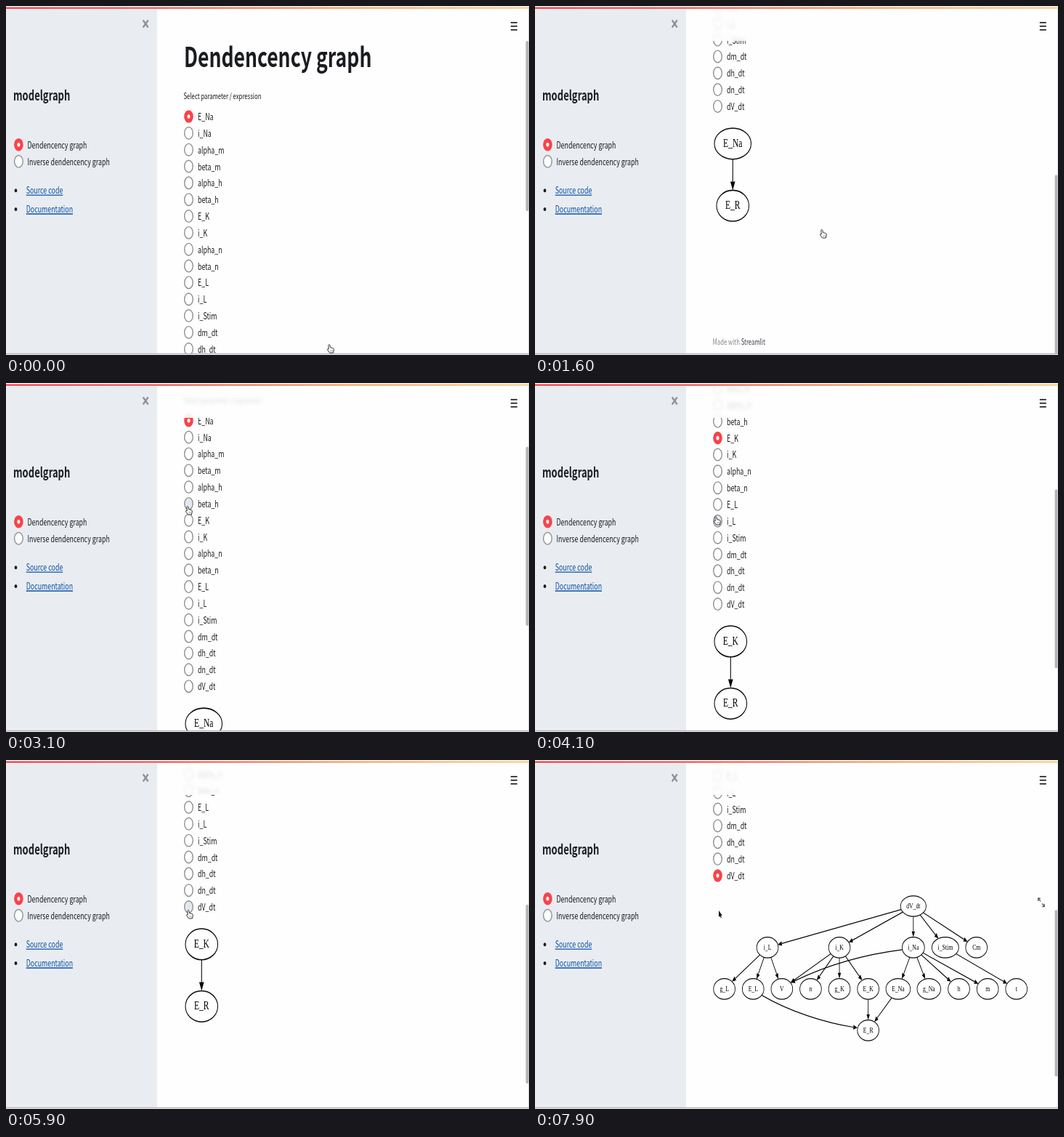
An HTML page with a canvas for the animation above (8 s loop, 720x480 px).

```html
<!DOCTYPE html>
<html lang="en">
<head>
<meta charset="utf-8">
<title>modelgraph</title>
<style>
html, body { margin: 0; width: 720px; height: 480px; overflow: hidden; background: #fff; }
canvas { display: block; width: 720px; height: 480px; }
</style>
</head>
<body>
<canvas id="stage" width="720" height="480"></canvas>
<script>
const ctx = document.getElementById('stage').getContext('2d');
const LOOP = 8000, STEP = 100;
const SX = 0.619, SY = 0.89;          // the page is squeezed sideways
const SANS = '"Noto Sans CJK JP", "Noto Sans CJK SC", "Noto Sans CJK", "Open Sans", sans-serif';
const SERIF = '"Liberation Serif", "Noto Serif", serif';
const INK = '#1b1c21', RED = '#f9424a', LINK = '#0a50a5', HEADER = 48;
const ROW0 = 152, ROW = 22.84;

const params = ['E_Na', 'i_Na', 'alpha_m', 'beta_m', 'alpha_h', 'beta_h', 'E_K', 'i_K', 'alpha_n',
  'beta_n', 'E_L', 'i_L', 'i_Stim', 'dm_dt', 'dh_dt', 'dn_dt', 'dV_dt'];

// Graphs in points: nodes are [label, x, y, rx], edges are index pairs with optional curve points
const pair = (name, rx) => ({
  x: 247 + rx * 0.825, y: 568.8, k: 1, pen: 1.3,
  nodes: [[name, 0, 0, rx], ['E_R', 0, 72, 27]], edges: [[0, 1]]
});
const full = {
  x: 245.8, y: 559.5, k: 0.6665, pen: 1.55,
  nodes: [['dV_dt', 500, 0, 32],
    ['i_L', 135, 72, 27], ['i_K', 315, 72, 27], ['i_Na', 500, 72, 28], ['i_Stim', 580, 72, 33.6], ['Cm', 658, 72, 27],
    ['g_L', 27, 144, 27], ['E_L', 99, 144, 27], ['V', 171, 144, 27], ['n', 243, 144, 27], ['g_K', 315, 144, 27],
    ['E_K', 387, 144, 27], ['E_Na', 462, 144, 30.6], ['g_Na', 539, 144, 29.5], ['h', 614, 144, 27],
    ['m', 686, 144, 27], ['t', 758, 144, 27], ['E_R', 387, 216, 27]],
  edges: [[0, 1], [0, 2], [0, 3], [0, 4], [0, 5], [1, 6], [1, 7], [1, 8], [2, 8], [2, 9], [2, 10], [2, 11],
    [3, 12], [3, 13], [3, 14], [3, 15], [4, 16], [11, 17], [12, 17],
    [3, 8, [473, 75.6, 353, 86, 262, 110, 194, 133]],
    [7, 17, [121, 155, 189, 183, 280, 203, 360, 211.6]]]
};
const graphNa = pair('E_Na', 30.6), graphK = pair('E_K', 27);

const scrollKeys = [[0, 0], [1000, 0], [1600, 379.5], [1900, 379.5], [2700, 100.3], [3700, 100.3],
  [4600, 371.5], [4900, 371.5], [5400, 315.4], [6600, 315.4], [7100, 378.5], [7400, 420], [7700, 358.5]];
const cursorKeys = [[0, 447, 471], [700, 397, 313], [1900, 397, 313], [2900, 253, 171], [3100, 252, 175],
  [3400, 251, 189], [5400, 251, 189], [5800, 253, 212]];

function at(keys, t, i = 1) {
  const n = keys.findIndex(k => k[0] > t);
  if (n < 0) return keys[keys.length - 1][i];
  const a = keys[n - 1], b = keys[n], u = (t - a[0]) / (b[0] - a[0]);
  return a[i] + (b[i] - a[i]) * u * u * (3 - 2 * u);
}

function text(str, x, y, size, color = INK, weight = 400) {
  ctx.save();
  ctx.translate(x, y);
  ctx.scale(SX, SY);
  ctx.font = `${weight} ${size * 0.894}px ${SANS}`;
  ctx.fillStyle = color;
  ctx.fillText(str, 0, 0);
  const w = ctx.measureText(str).width * SX;
  ctx.restore();
  return w;
}

function oval(x, y, rx, ry, fill, stroke, width) {
  ctx.beginPath();
  ctx.ellipse(x, y, rx, ry, 0, 0, Math.PI * 2);
  if (fill) { ctx.fillStyle = fill; ctx.fill(); }
  if (stroke) { ctx.strokeStyle = stroke; ctx.lineWidth = width; ctx.stroke(); }
}

function line(pts, color, width) {
  ctx.beginPath();
  pts.forEach(p => ctx.lineTo(p[0], p[1]));
  ctx.strokeStyle = color;
  ctx.lineWidth = width;
  ctx.stroke();
}

function radio(x, y, label, lx, on, hover) {
  if (on) {
    oval(x, y, 6.3, 8.8, RED);
    oval(x, y, 2, 2.8, '#fff');
  } else oval(x, y, 5.8, 8.3, hover ? '#e4e8ee' : '#fff', '#8f9093', 1.4);
  text(label, lx, y + 5, 16);
}

function edge(a, b, curve) {
  let p = curve;
  if (!p) {
    const dx = b[1] - a[1], dy = b[2] - a[2];
    const cut = n => 1 / Math.hypot(dx / n[3], dy / 18);
    const s = cut(a), e = 1 - cut(b);
    const x0 = a[1] + dx * s, y0 = a[2] + dy * s, x1 = a[1] + dx * e, y1 = a[2] + dy * e;
    p = [x0, y0, x0, y0, x1 - dx * 0.01, y1 - dy * 0.01, x1, y1];
  }
  const ang = Math.atan2(p[7] - p[5], p[6] - p[4]), c = Math.cos(ang), s = Math.sin(ang);
  const bx = p[6] - 10 * c, by = p[7] - 10 * s;
  ctx.beginPath();
  ctx.moveTo(p[0], p[1]);
  if (curve) ctx.bezierCurveTo(p[2], p[3], p[4], p[5], bx, by);
  else ctx.lineTo(bx, by);
  ctx.stroke();
  ctx.beginPath();
  ctx.moveTo(p[6], p[7]);
  ctx.lineTo(bx - 4 * s, by + 4 * c);
  ctx.lineTo(bx + 4 * s, by - 4 * c);
  ctx.closePath();
  ctx.fill();
}

function drawGraph(g) {
  ctx.save();
  ctx.translate(g.x, g.y);
  ctx.scale(SX * 4 / 3 * g.k, SY * 4 / 3 * g.k);
  ctx.fillStyle = ctx.strokeStyle = '#000';
  ctx.lineWidth = g.pen;
  g.edges.forEach(([a, b, curve]) => edge(g.nodes[a], g.nodes[b], curve));
  ctx.font = `14px ${SERIF}`;
  ctx.textAlign = 'center';
  for (const [name, x, y, rx] of g.nodes) {
    oval(x, y, rx, 18, '#fff', '#0a0a0a', g.pen);
    ctx.fillStyle = '#000';
    ctx.fillText(name, x, y + 3.7);
  }
  ctx.restore();
}

function expandIcon(x, y, alpha) {
  ctx.save();
  ctx.translate(x, y);
  ctx.globalAlpha *= alpha;
  for (const d of [-1, 1]) {
    line([[d * 1, d * 1.5], [d * 4, d * 5.5]], '#2c2d35', 1.4);
    line([[d * 1.2, d * 5.7], [d * 4.2, d * 5.7], [d * 4.2, d * 1.8]], '#2c2d35', 1.4);
  }
  ctx.restore();
}

function drawContent(s) {
  ctx.save();
  ctx.translate(0, -s.scroll);
  text('Dendencency graph', 245, 84, 48, INK, 700);
  text('Select parameter / expression', 244.5, 128, 14);
  params.forEach((name, i) => {
    const y = ROW0 + ROW * i;
    const hover = s.hand && s.cx < 260 && Math.abs(s.cy - 3 + s.scroll - y) < 10;
    radio(251.5, y, name, 264, i === s.selected, hover);
  });
  drawGraph(s.graph);
  if (s.icon) expandIcon(697, 554.4, s.icon);
  const foot = s.graph === full ? 913 : 845;
  const w = text('Made with ', 244.5, foot, 14, '#85878f');
  text('Streamlit', 244.5 + w, foot, 14, '#3f414a');
  ctx.restore();
}

function clipped(y, h, draw) {
  ctx.save();
  ctx.beginPath();
  ctx.rect(208, y, 512, h);
  ctx.clip();
  draw();
  ctx.restore();
}

function drawSidebar() {
  ctx.fillStyle = '#e9edf2';
  ctx.fillRect(0, 4, 208, 474);
  line([[188.7, 19.5], [195.7, 29.5]], '#8e9096', 2.2);
  line([[195.7, 19.5], [188.7, 29.5]], '#8e9096', 2.2);
  text('modelgraph', 10, 130, 23.6, INK, 700);
  radio(17.4, 190.7, 'Dendencency graph', 29.5, true);
  radio(17.4, 213.8, 'Inverse dendencency graph', 29.5, false);
  [['Source code', 253.7], ['Documentation', 279.5]].forEach(([label, y]) => {
    oval(13.5, y, 1.9, 2.5, INK);
    const w = text(label, 27.7, y + 4.5, 16, LINK);
    line([[27.7, y + 6.5], [27.7 + w, y + 6.5]], LINK, 1.3);
  });
}

function drawCursor(s) {
  ctx.save();
  ctx.translate(s.cx, s.cy);
  const shape = s.hand
    ? 'M-3.2-4.6Q-2.2-6.6-1.1-4.6L-.5-1.4 2.8-.6Q4.6 0 4.3 2L3.4 6H-1.4L-4.6 1.6Q-4.6-.2-2.7.9Z'
    : 'M0-5V4L1.6 2.4 2.9 5.2 4 4.6 2.8 1.9H4.8Z';
  const path = new Path2D(shape);
  ctx.lineWidth = 1;
  ctx.fillStyle = s.hand ? '#fff' : '#111';
  ctx.strokeStyle = s.hand ? '#333' : '#fff';
  if (!s.hand) ctx.stroke(path);
  ctx.fill(path);
  if (s.hand) {
    ctx.stroke(path);
    line([[0, 2], [0, 4.5]], '#777', 0.7);
    line([[2, 2], [2, 4.5]], '#777', 0.7);
  }
  ctx.restore();
}

function drawChrome(s) {
  [22.8, 27.8, 32.8].forEach(y => line([[694.8, y], [703.8, y]], '#1f2026', 1.7));
  const big = s.graph === full;
  const top = (big ? 35 : 36) + s.scroll * (big ? 0.478 : 0.517), end = top + (big ? 229 : 246);
  const from = Math.max(top, HEADER);
  ctx.fillStyle = '#d6d7d9';
  ctx.fillRect(719.2, 4, 0.8, 474);
  ctx.fillStyle = '#b4b5b7';
  ctx.beginPath();
  ctx.roundRect(715.6, from, 3.9, end - from, 2);
  ctx.fill();
  const bar = ctx.createLinearGradient(0, 0, 720, 0);
  bar.addColorStop(0, '#f5323f');
  bar.addColorStop(0.3, '#f4514a');
  bar.addColorStop(0.65, '#f9a05a');
  bar.addColorStop(1, '#fbd287');
  ctx.fillStyle = '#f0eeee';
  ctx.fillRect(0, 0, 720, 2);
  ctx.fillStyle = bar;
  ctx.fillRect(0, 1.7, 720, 2.1);
  ctx.fillStyle = '#b3b4b6';
  ctx.fillRect(0, 477.7, 720, 1.4);
  ctx.fillStyle = '#e4e4e5';
  ctx.fillRect(0, 479.1, 720, 0.9);
}

function stateAt(t) {
  return {
    scroll: at(scrollKeys, t),
    cx: at(cursorKeys, t, 1),
    cy: at(cursorKeys, t, 2),
    hand: t < 4300 || (t >= 5500 && t < 6600),
    selected: t < 3600 ? 0 : t < 6300 ? 6 : 16,
    graph: t < 3700 ? graphNa : t < 6500 ? graphK : full,
    icon: t >= 4700 && t < 5500 ? 1 : t >= 7900 ? 0.75 : t >= 7800 ? 0.4 : 0
  };
}

function render(t) {
  const s = stateAt(t);
  ctx.fillStyle = '#fefefe';
  ctx.fillRect(0, 0, 720, 480);
  clipped(HEADER, 480 - HEADER, () => drawContent(s));
  if (s.scroll > 0) clipped(4, HEADER - 4, () => {
    ctx.globalAlpha = 0.15;
    ctx.filter = 'blur(2px)';
    drawContent(s);
  });
  drawSidebar();
  drawChrome(s);
  drawCursor(s);
}

let start;
function tick(now) {
  if (start === undefined) start = now;
  render(Math.floor(((now - start) % LOOP) / STEP) * STEP);
  requestAnimationFrame(tick);
}
render(0);
requestAnimationFrame(tick);
</script>
</body>
</html>
```
